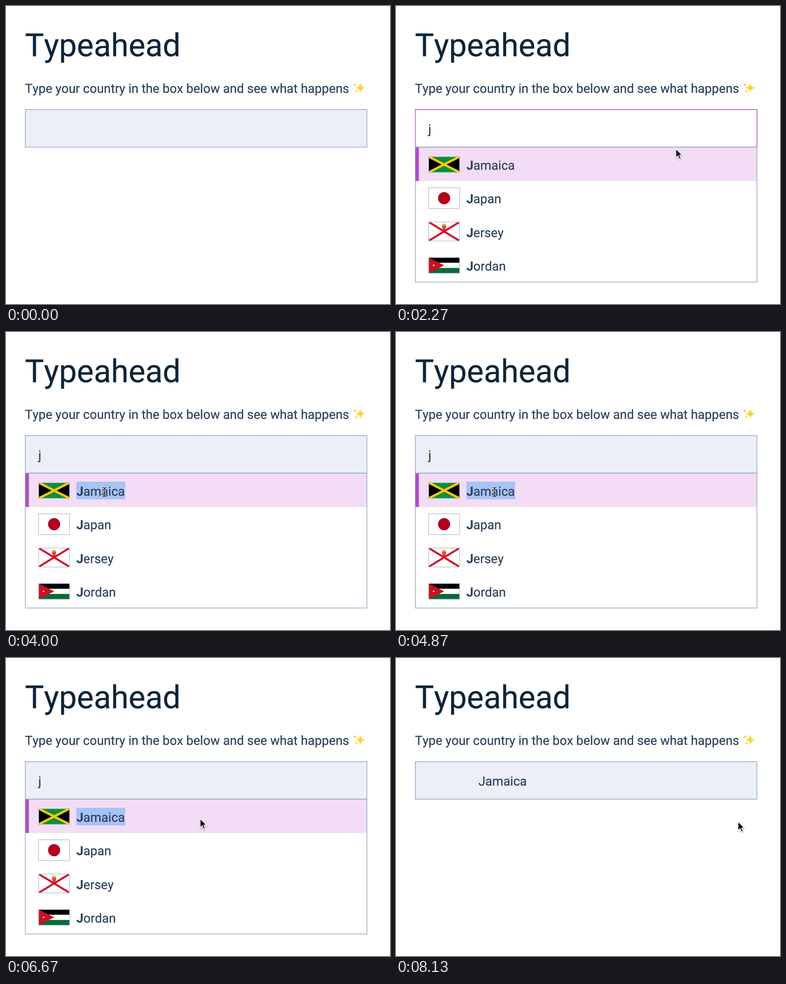
Animation of 850 by 659 pixels, one loop 8340 ms. Source, as an HTML page:

```html
<!DOCTYPE html>
<html lang="en">
<head>
<meta charset="utf-8">
<title>Typeahead</title>
<style>
  html, body { margin: 0; width: 100%; height: 100%; overflow: hidden; background: #fff; }
  svg { display: block; width: 850px; height: 659px; }
  svg svg { width: auto; height: auto; }
  text {
    font: 28px Roboto, sans-serif; white-space: pre;
    font-kerning: none; text-rendering: geometricPrecision;
    fill: #2a3f5a; stroke: #2a3f5a; stroke-width: .25px;
  }
  .title { font-size: 70.4px; fill: #0e2439; stroke: #0e2439; }
  .b { font-weight: 700; stroke: none; }
  .line { fill: none; stroke: #8aa3c0; stroke-width: 1.4px; }
  .edge { fill: none; stroke: #b3c1d3; stroke-width: 1.4px; }

  /* Hard switches */
  .focus, .empty, .caret, .list, .dots, .flags,
  .hover, .picked, .done, .arrow, .beam {
    opacity: 0; animation: 8.34s step-end infinite;
  }
  .focus  { animation-name: focus; }
  .empty  { animation-name: empty; }
  .caret  { animation-name: caret; }
  .list   { animation-name: list; }
  .dots   { animation-name: dots; }
  .flags  { animation-name: flags; }
  .hover  { animation-name: hover; }
  .picked { animation-name: picked; }
  .done   { animation-name: done; }
  .arrow  { animation-name: arrow; }
  .beam   { animation-name: beam; }
  @keyframes focus  { 5.62% { opacity: 1 } 45.54% { opacity: 0 } }
  @keyframes empty  { 5.62% { opacity: 1 } 11.97% { opacity: 0 } }
  @keyframes caret  { 17.6% { opacity: 1 } 23.97% { opacity: 0 } 30.32% { opacity: 1 }
                      36.8% { opacity: 0 } 42.3% { opacity: 1 } 45.54% { opacity: 0 } }
  @keyframes list   { 17.6% { opacity: 1 } 89.54% { opacity: 0 } }
  @keyframes dots   { 17.6% { opacity: 1 } 19.17% { opacity: 0 } }
  @keyframes flags  { 19.17% { opacity: 1 } 89.54% { opacity: 0 } }
  @keyframes hover  { 25.53% { opacity: 1 } 89.54% { opacity: 0 } }
  @keyframes picked { 45.54% { opacity: 1 } 89.54% { opacity: 0 } }
  @keyframes done   { 89.54%, 100% { opacity: 1 } }
  @keyframes arrow  { 25.53% { opacity: 1 } 35% { opacity: 0 } 78.4%, 100% { opacity: 1 } }
  @keyframes beam   { 35% { opacity: 1 } 78.4% { opacity: 0 } }

  .mouse { animation: travel 8.34s linear infinite; }
  @keyframes travel {
    0%, 25.53% { transform: translate(621px, 312px) }
    27.2%, 27.94% { transform: translate(619px, 314.5px); animation-timing-function: ease-in-out }
    37.53%, 77.58% { transform: translate(218px, 354px) }
    79.97% { transform: translate(427.5px, 354px); animation-timing-function: cubic-bezier(.33, .67, .67, 1) }
    87.17%, 100% { transform: translate(756.6px, 360.5px) }
  }
</style>
</head>
<body>
<svg viewBox="0 0 850 659">
  <defs>
    <path id="star" fill="#fdd231" d="M0-12Q1-1 11 0Q1 1 0 12Q-1 1-11 0Q-1-1 0-12Z"/>
    <path id="bar" d="M-4-10Q0-10 0-7Q0-10 4-10M0-7V7M-4 10Q0 10 0 7Q0 10 4 10M-2.5 2.5H2.5"/>
    <filter id="shade" x="-50%" y="-50%" width="200%" height="200%">
      <feDropShadow dx="0" dy="1.5" stdDeviation="1.2" flood-opacity=".4"/>
    </filter>
  </defs>

  <text class="title" x="42" y="111">Typeahead</text>
  <text x="42" y="192">Type your country in the box below and see what happens</text>
  <use href="#star" transform="translate(784.3 181)"/>
  <use href="#star" transform="translate(772.3 174.3) scale(.42)"/>
  <use href="#star" transform="translate(775.8 188.6) scale(.36)"/>

  <!-- Input -->
  <rect class="line" x="42.7" y="229.2" width="756.2" height="83" style="fill:#eceff8"/>
  <rect class="focus" x="42.7" y="229.2" width="756.2" height="83" fill="#fff" stroke="#b14fc2" stroke-width="1.4"/>
  <rect class="empty" x="71.3" y="253" width="1.5" height="36" fill="#0e2439"/>
  <text class="list" x="71.5" y="282">j</text>
  <rect class="caret" x="78.6" y="253" width="1.5" height="36" fill="#0e2439"/>
  <text class="done" x="182.4" y="282">Jamaica</text>

  <!-- Suggestions -->
  <g class="list">
    <rect x="42.7" y="312.2" width="756.2" height="298.2" fill="#fff"/>
    <g class="hover">
      <rect x="43" y="312.5" width="755.6" height="74.5" fill="#f3dcf6"/>
      <rect x="43" y="312.5" width="7.6" height="74.5" fill="#ad50bf"/>
    </g>
    <rect class="line" x="42.7" y="312.2" width="756.2" height="298.2"/>
  </g>
  <rect class="picked" x="155.8" y="331" width="108" height="39" fill="#a6c3f8"/>
  <g class="dots" id="dots"></g>
  <g class="flags">
    <g id="names"></g>
    <!-- Jamaica -->
    <g transform="translate(72 333)">
      <path fill="#0b9038" d="M0 0H69V35H0Z"/>
      <path d="M0 0L34.5 17.5L0 35ZM69 0L34.5 17.5L69 35Z"/>
      <path d="M1.5 .8L67.5 34.2M1.5 34.2L67.5 .8" stroke="#fdc913" stroke-width="5"/>
      <rect class="edge" x=".2" y=".2" width="68.6" height="34.8"/>
    </g>
    <!-- Japan -->
    <rect class="edge" x="72.2" y="402" width="68.6" height="46"/>
    <circle cx="106.5" cy="425" r="13.4" fill="#b3001f"/>
    <!-- Jersey -->
    <g transform="translate(72 477.5)">
      <path d="M1.5 .9L67.5 41.1M1.5 41.1L67.5 .9" stroke="#d4102c" stroke-width="4.2"/>
      <path fill="#d4102c" d="M30.5 8H38.5V12.5Q38 16.5 34.5 18.5Q31 16.5 30.5 12.5Z"/>
      <path fill="#e8b62c" d="M30.3 7.8L29.8 4L32.4 5.2L34.5 2.6L36.6 5.2L39.2 4L38.7 7.8Z"/>
      <path d="M32 10H37M32 12.6H37M33 15.2H36" stroke="#e8b62c" stroke-width="1.2"/>
      <rect class="edge" x=".2" y=".1" width="68.6" height="42"/>
    </g>
    <!-- Jordan -->
    <g transform="translate(72 556)">
      <path d="M0 0H69V11.7H0Z"/>
      <path fill="#066b37" d="M0 23.3H69V35H0Z"/>
      <path fill="#ca1020" d="M0 0L34.5 17.5L0 35Z"/>
      <circle cx="11.3" cy="17.5" r="1.7" fill="#fff"/>
      <rect class="edge" x=".2" y=".2" width="68.6" height="34.8"/>
    </g>
  </g>

  <!-- Pointer -->
  <g class="mouse">
    <path class="arrow" filter="url(#shade)" stroke="#fff" stroke-width="1.5"
      transform="translate(0 .6) scale(1.07)"
      d="M.5 .5V19.3L4.8 15.2L7.6 22L10.9 20.6L8.1 14H13.8Z"/>
    <g class="beam" fill="none" stroke-linecap="square">
      <use href="#bar" stroke="#fff" stroke-width="3.4"/>
      <use href="#bar" stroke="#000" stroke-width="1.5"/>
    </g>
  </g>
</svg>
<script>
  const rows = ['Jamaica', 'Japan', 'Jersey', 'Jordan'];
  const label = (name, x, y) =>
    `<text x="${x}" y="${y}"><tspan class="b">${name[0]}</tspan>${name.slice(1)}</text>`;
  const fill = (id, row) => {
    document.getElementById(id).innerHTML =
      rows.map((name, i) => row(name, 361.8 + i * 74.4)).join('');
  };
  fill('names', (name, y) => label(name, 155.7, y));
  fill('dots', (name, y) =>
    `<rect x="71.6" y="${y - 12}" width="2.8" height="2.8" fill="#b9bec6"/>` + label(name, 88.4, y));
</script>
</body>
</html>
```
